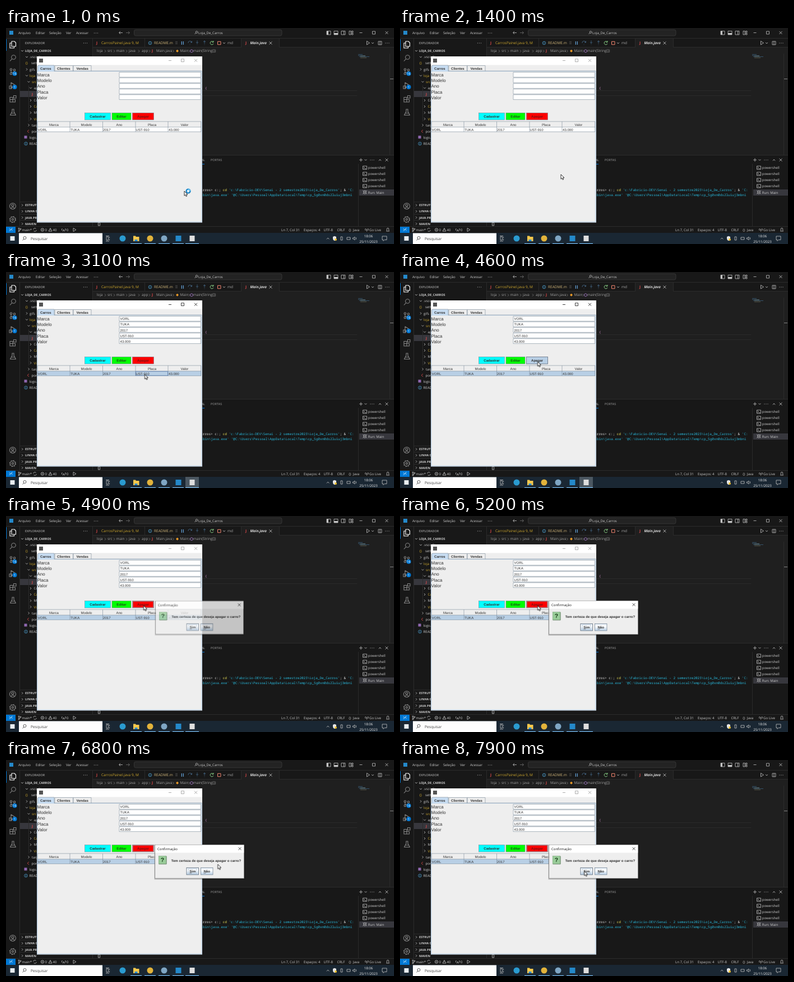
These frames come from a looping animation (692 px wide and 388 px high, 8000 ms). An HTML page:

```html
<!DOCTYPE html>
<html lang="pt-BR">
<head>
<meta charset="utf-8">
<title>Loja de carros</title>
<style>
html, body { margin: 0; width: 100%; height: 100%; overflow: hidden; background: #181818; }
svg { display: block; width: 100vw; height: 100vh; }
text { font: 6.1px "Open Sans", sans-serif; fill: #ccc; text-rendering: geometricPrecision; white-space: pre; }
.tabs text { font-size: 6.5px; }
.crumbs text { font-size: 6.4px; fill: #a0a0a0; }
.small text { font-size: 5.5px; }
.bold text { font-size: 5.5px; font-weight: 700; }
.mono text { font: 6px "Noto Sans Mono", monospace; fill: #29b8db; }
.swing text { font: 6.1px "Liberation Sans", Arial, sans-serif; fill: #333; }
.swing .b text, .swing text.b { font-weight: 700; }
.swing .label text { font-size: 8px; }
.mid { text-anchor: middle; }
.line { fill: none; stroke: #c5c5c5; stroke-width: .8; }
.solid { fill: #c5c5c5; }
.rule { fill: none; stroke: #2b2b2b; }
.metal { fill: none; stroke: #7a8a99; stroke-width: .6; }
.yellow, text.yellow { fill: #cca72e; }
.red, text.red { fill: #e0494b; font-weight: 700; }
.white, text.white { fill: #fff; }
.plain, text.plain { fill: #ddd; }

/* The small lead keeps samples off the step edges. */
.anim { animation: 8s -5ms step-end infinite; }
#cursor { animation-name: move; }
#busy { animation-name: busy; }
#selected { animation-name: select; }
#cellFocus { animation-name: cell; }
#titleIcons { animation-name: activate; }
#taskActive { animation-name: task; }
#pressed { animation-name: press; }
#dialogOpen { animation-name: open; transform-origin: 345px 182px; }
#ring { animation-name: ring; }

@keyframes move {
  0% { transform: translate(318px, 293px); animation-timing-function: steps(8); }
  10%, 13.75% { transform: translate(301px, 286px); }
  13.75% { animation-timing-function: steps(3); }
  17.5% { transform: translate(287px, 263px); animation-timing-function: steps(6); }
  25%, 48.75% { transform: translate(247.5px, 184px); }
  48.75% { animation-timing-function: steps(7); }
  57.5%, 67.5% { transform: translate(245.5px, 161px); }
  67.5% { animation-timing-function: steps(5); }
  73.75% { transform: translate(339.5px, 178.5px); animation-timing-function: steps(4); }
  78.75% { transform: translate(409px, 181.5px); animation-timing-function: steps(6); }
  86.25%, 88.75% { transform: translate(371.5px, 188.5px); }
  88.75% { animation-timing-function: steps(8); }
  98.75%, 100% { transform: translate(328.7px, 199.5px); }
}
@keyframes busy { 0% { opacity: 1; } 6.25%, 100% { opacity: 0; } }
@keyframes select { 0% { opacity: 0; } 32.5%, 100% { opacity: 1; } }
@keyframes cell { 0% { opacity: 0; } 32.5% { opacity: 1; } 57.5%, 100% { opacity: 0; } }
@keyframes activate { 0% { stroke: #999; } 32.5% { stroke: #111; } 60%, 100% { stroke: #999; } }
@keyframes task { 0% { opacity: 0; } 32.5% { opacity: 1; } 60%, 100% { opacity: 0; } }
@keyframes press { 0% { opacity: 0; } 57.5% { opacity: 1; } 60%, 100% { opacity: 0; } }
@keyframes ring { 0% { opacity: 0; } 60%, 100% { opacity: 1; } }
@keyframes open {
  0% { opacity: 0; transform: scale(.94); }
  60% { opacity: .3; transform: scale(.95); }
  61.25% { opacity: .8; transform: scale(.987); }
  62.5%, 100% { opacity: 1; transform: none; }
}
</style>
</head>
<body>
<svg viewBox="0 0 692 388" preserveAspectRatio="none">
<defs>
  <path id="right" class="line" d="M-1-2 1 0-1 2"/>
  <path id="down" class="line" d="M-2-1 0 1 2-1"/>
  <path id="cross" d="M-2.5-2.5 2.5 2.5M2.5-2.5-2.5 2.5"/>
  <g id="dots" fill="#c5c5c5"><circle cx="-3" r=".6"/><circle r=".6"/><circle cx="3" r=".6"/></g>
  <g id="info"><circle r="2.8" fill="none" stroke="#4da3d4" stroke-width=".8"/><path d="M0-.5V1.6M0-1.7v.6" stroke="#4da3d4" stroke-width=".8"/></g>
  <g id="shell" class="line"><path d="M-3.5-3h7v6h-7zM-2-1.5-.5 0-2 1.5M0 1.7h2"/></g>
  <linearGradient id="metalFill" x2="0" y2="1">
    <stop stop-color="#dde8f3"/><stop offset=".35" stop-color="#fff"/><stop offset="1" stop-color="#b8cfe5"/>
  </linearGradient>
</defs>

<!-- Editor frame -->
<rect width="692" height="388" fill="#181818"/>
<rect x="154" y="34" width="538" height="194" fill="#1f1f1f"/>
<path class="rule" d="M0 18.5H692M24.5 19V356M154.5 19V356M154 228.5H692M0 356.5H692M154 34.5H420M487 34.5H692M247.5 19V34M419.5 19V34M487.5 19V34M628.5 244V356"/>
<rect x="420" y="19" width="67" height="16" fill="#1f1f1f"/>
<path d="M.5 20v21" stroke="#0078d4"/>

<!-- Title bar -->
<rect x="6" y="5" width="7" height="7" fill="#2489ca"/>
<text x="22" y="11">Arquivo</text><text x="53" y="11">Editar</text><text x="77" y="11">Seleção</text>
<text x="107" y="11">Ver</text><text x="125" y="11">Acessar</text>
<use href="#dots" x="160.5" y="9"/>
<path class="line" d="M208 8.5h-6M204 6l-2.5 2.5L204 11"/>
<path class="line" opacity=".5" d="M214 8.5h6M218 6l2.5 2.5L218 11"/>
<rect x="228.5" y="3" width="263.5" height="11" rx="3" fill="#232323" stroke="#3c3c3c" stroke-width=".8"/>
<path class="line" d="M336.5 11l2-2M341.8 7.5a1.8 1.8 0 1 1-3.6 0a1.8 1.8 0 1 1 3.6 0"/>
<text x="343" y="11">Loja_De_Carros</text>
<path class="line" d="M572 5.5h7V12h-7zM585 5.5h7V12h-7zM598 5.5h7V12h-7zM602.5 5.5V12M612 5.5h3V12h-3zM616.5 5.5h2.5V8h-2.5zM616.5 9.5h2.5V12h-2.5zM630.5 8.5h5M653.5 6h5v5h-5z"/>
<path class="solid" d="M572 5.5h3V12h-3zM585 9h7v3h-7z"/>
<use href="#cross" class="line" x="679" y="8.5"/>

<!-- Activity bar -->
<g class="line" stroke-linejoin="round" style="stroke:#868686;stroke-width:1.1">
  <path style="stroke:#fff" d="M10 24h5l2.5 2.5V33H10zM10 27H7v9h7.5v-3"/>
  <circle cx="13.5" cy="52.5" r="3.8"/><path d="M10.8 55.3 7 59.5"/>
  <circle cx="9" cy="74.5" r="1.7"/><circle cx="9" cy="82" r="1.7"/><circle cx="15" cy="75.5" r="1.7"/><path d="M9 76.2v4M15 77.2q0 2.5-6 3"/>
  <path d="M9 98l8 5-8 5zM6 104h4v5H6z"/>
  <path d="M7 124.5h5v8.5H7zM7 128.5h9.5v4.5H12M13.5 121.5H18v4.5h-4.5z"/>
  <path d="M10.5 146h4M11 146v4l-3.5 6.5h10L14 150v-4M9.5 153h6"/>
  <circle cx="12" cy="320" r="5.5"/><circle cx="12" cy="318.5" r="2"/><path d="M8.5 324q3.5-4 7 0"/>
  <circle cx="12" cy="344" r="4.5"/><circle cx="12" cy="344" r="1.6"/><circle cx="12" cy="344" r="5.5" stroke-dasharray="2.2 2.12"/>
</g>
<g fill="#0078d4"><circle cx="15.5" cy="82" r="4"/><circle cx="15.5" cy="106" r="4"/></g>
<g class="mid small"><text class="white" x="15.5" y="83.9">16</text><text class="white" x="15.5" y="107.9">1</text></g>

<!-- Explorer -->
<g class="small"><text x="34" y="29">EXPLORADOR</text></g>
<use href="#dots" x="141.5" y="27"/>
<rect x="25" y="113" width="129" height="11" fill="#37373d"/>
<g class="bold">
  <text x="34" y="43">LOJA_DE_CARROS</text>
  <text x="34" y="320.3">ESTRUTURA</text><text x="34" y="331.3">LINHA DO TEMPO</text>
  <text x="34" y="342.5">JAVA PROJECTS</text><text x="34" y="353.7">MAVEN</text>
</g>
<path class="rule" d="M25 312.5h30M25 323.5h30M25 334.5h30M25 345.5h30M40.5 103v65"/>
<use href="#down" x="29" y="41"/><use href="#right" x="29" y="318.3"/><use href="#right" x="29" y="329.3"/>
<use href="#right" x="29" y="340.5"/><use href="#right" x="29" y="351.7"/>
<use href="#down" x="37" y="52"/><use href="#right" x="37" y="74.3"/><use href="#down" x="37" y="85.5"/>
<use href="#down" x="40.5" y="96.6"/><use href="#down" x="44" y="107.7"/><use href="#right" x="44" y="130"/>
<use href="#right" x="44" y="141"/><use href="#right" x="44" y="152.2"/><use href="#right" x="44" y="163.3"/><use href="#right" x="40.5" y="174.5"/>
<text x="42" y="54.3">.vscode</text>
<text class="yellow" x="34.5" y="65.3">{}</text><text x="45" y="65.3">settings.json</text>
<text x="42" y="76.5">gifs</text><text class="yellow" x="42" y="87.5">loja</text>
<text class="yellow" x="46" y="98.7">src</text><text x="49.5" y="109.9">app</text>
<text class="red" x="46" y="121">J</text>
<text x="49.5" y="132.2">Connection</text><text class="yellow" x="49.5" y="143.2">Carros</text>
<text x="49.5" y="154.4">Model</text><text class="yellow" x="49.5" y="165.5">View</text>
<text x="46" y="176.6">target</text>
<path d="M41 183l-3 2.5 3 2.5" class="line" style="stroke:#e0494b"/><text x="45.5" y="187.8">pom.xml</text>
<rect x="32.5" y="193.5" width="5" height="5" fill="#9068b0"/><text x="41.5" y="199">logo.png</text>
<use href="#info" x="35.5" y="207.7"/><text x="41.5" y="210">README.md</text>

<!-- Editor tabs -->
<g class="tabs">
  <text class="red" x="161" y="29.3">J</text><text class="yellow" x="170" y="29.3">CarrosPainel.java 9, M</text>
  <use href="#info" x="257" y="27"/><text x="264" y="29.3" style="fill:#d0b57a">README.md</text>
  <text x="395" y="29.3" style="fill:#a8a8a8">md</text>
  <rect x="298" y="20" width="95.5" height="14" fill="#181818"/>
  <text class="red" x="427" y="29.3">J</text><text class="white" x="435.5" y="29.3" style="font-style:italic;font-weight:600">Main.java</text>
</g>
<g fill="none" stroke="#75beff">
  <path stroke="#777" stroke-dasharray="1 1" d="M303 24v6M305 24v6"/>
  <path d="M313.3 24v6M316.3 24v6"/>
  <path opacity=".4" d="M325 27a3 3 0 0 1 6-1M331.5 23.5V26H329M328 29.5v.8M341 22.5v5M339 25.5l2 2 2-2M341 29.5v.8M354 28v-5M352 25l2-2 2 2M354 29.5v.8"/>
  <path stroke="#89d185" d="M369.5 25a3 3 0 1 0 .5 3M370 23v2.5h-2.5"/>
  <path stroke="#f48771" d="M377.5 24.3h5.5v5.5h-5.5z"/>
</g>
<use href="#down" x="389" y="27"/>
<use href="#cross" class="line" x="472" y="27"/>
<path class="line" d="M643.5 23.5l5 3.3-5 3.3zM664 24h6v6h-6zM667 24v6"/>
<use href="#down" x="654" y="27"/><use href="#dots" x="680" y="27"/>

<!-- Breadcrumb and code -->
<g class="crumbs">
  <text x="162" y="43.4">loja</text><text x="181" y="43.4">src</text><text x="196.5" y="43.4">main</text>
  <text x="219" y="43.4">java</text><text x="242" y="43.4">app</text><text class="red" x="260" y="43.4" style="fill:#e0494b">J</text>
  <text x="268" y="43.4">Main.java</text><text x="310.5" y="43.4">Main</text><text x="334" y="43.4">main(String[])</text>
</g>
<g opacity=".6"><use href="#right" x="177" y="41.5"/><use href="#right" x="193" y="41.5"/><use href="#right" x="215" y="41.5"/>
<use href="#right" x="237" y="41.5"/><use href="#right" x="256" y="41.5"/><use href="#right" x="298.5" y="41.5"/><use href="#right" x="327" y="41.5"/></g>
<path d="M303 41.3l2.5-2.5 2.5 2.5-2.5 2.5z" fill="#ee9d28"/><path d="M331 38.7l2.3 1.3v2.7L331 44l-2.3-1.3V40z" fill="none" stroke="#b180d7" stroke-width=".8"/>
<path class="rule" d="M350 112.5h276M350 121.5h276M684.5 46V228"/>
<g class="mono"><text x="355" y="109.7" style="fill:#c586c0">{</text></g>
<g fill="none" stroke-width=".7" opacity=".7">
  <path stroke="#4d88b5" d="M628 47.5h8M628 49.5h13M630 51.5h18"/><path stroke="#9a9a7a" d="M632 50.5h9M632 53.5h11"/>
</g>
<path d="M685 91.5h6" stroke="#888"/>

<!-- Terminal -->
<g class="small"><text x="328" y="239">TERMINAL</text><text x="365" y="239" style="fill:#a0a0a0">PORTAS</text></g>
<path d="M329 244.5h25" stroke="#0078d4"/>
<path class="line" d="M630 237h6M633 234v6M665 238.5l2-2.5 2 2.5"/>
<use href="#down" x="641.5" y="237"/><use href="#dots" x="653" y="237"/><use href="#cross" class="line" x="679" y="237"/>
<g class="mono">
  <text x="347" y="293.2"><tspan class="plain">arros&gt; c:; </tspan><tspan fill="#f0e65a">cd</tspan> 'c:\Fabricio-DEV\Senai - 2 semestre2023\Loja_De_Carros'<tspan class="plain">; &amp; </tspan>'C:</text>
  <text x="347.5" y="302">\bin\java.exe' '@C:\Users\Pessoal\AppData\Local\Temp\cp_5g0xn0ds2luiuj3mbni</text>
</g>
<path class="line" d="M164.5 349.5h3v5.5h-3z"/>
<rect x="630" y="290" width="62" height="11" fill="#37373d"/>
<use href="#shell" x="640" y="251"/><use href="#shell" x="640" y="262"/><use href="#shell" x="640" y="273"/><use href="#shell" x="640" y="284"/>
<path class="line" d="M638 294a2 2 0 0 1 4 0v2a2 2 0 0 1-4 0zM636.3 292l1.7 1.5M643.7 292l-1.7 1.5M636.3 298l1.7-1.5M643.7 298l-1.7-1.5M638 295h4"/>
<text x="645.7" y="253.3">powershell</text><text x="645.7" y="264.3">powershell</text><text x="645.7" y="275.3">powershell</text>
<text x="645.7" y="286.3">powershell</text><text x="645.7" y="297.5">Run: Main</text>

<!-- Status bar -->
<rect y="357" width="17" height="11" fill="#0078d4"/>
<path class="line" style="stroke:#fff" d="M6 360.5l2.5 2-2.5 2M11.5 359.5l-2.5 2 2.5 2"/>
<g class="line">
  <circle cx="23" cy="360" r="1"/><circle cx="23" cy="365" r="1"/><circle cx="26" cy="361" r="1"/><path d="M23 361v3M26 362q0 1.5-3 1.5"/>
  <path d="M48.5 362a3 3 0 0 1 5-1.5M54.5 363a3 3 0 0 1-5 1.5"/>
  <circle cx="65" cy="362.5" r="2.7"/><path d="M64 361.5l2 2M66 361.5l-2 2M76 365l3-5.5 3 5.5zM79 361.5v1.5"/>
  <path d="M100.500 360a2.500 2.500 0 0 0 0 4M105.500 360a2.500 2.500 0 0 1 0 4M103 362l-1.500 3.500M103 362l1.500 3.500M120 359.5l5 3-5 3z"/>
  <circle cx="643.5" cy="362" r=".6"/><path d="M641.5 364a2.800 2.800 0 0 1 0-4M645.5 360a2.800 2.800 0 0 1 0 4M643.5 362v3.5M678.5 365h5l-.8-1.500V361a1.700 1.700 0 0 0-3.400 0v2.500z"/>
</g>
<text x="28.5" y="364.7">main*</text><text x="69.5" y="364.7">0</text><text x="83.5" y="364.7">40</text><text x="108" y="364.7">0</text>
<text x="491" y="364.7">Ln 7, Col 31</text><text x="531" y="364.7">Espaços: 4</text><text x="566.5" y="364.7">UTF-8</text>
<text x="590.5" y="364.7">CRLF</text><text x="611" y="364.7">{}  Java</text><text x="648" y="364.7">Go Live</text>

<!-- Taskbar -->
<rect y="368" width="692" height="20" fill="#1a2733"/>
<rect x="7.5" y="374" width="8" height="8" fill="#e8eef2"/>
<rect x="23" y="368.5" width="149" height="19.5" fill="#fdfdfd"/>
<path class="line" style="stroke:#333" d="M29.5 381.5l2.5-2.5M36 377a2.5 2.5 0 1 1-5 0a2.5 2.5 0 1 1 5 0"/>
<text x="44" y="380.8" style="font-size:6.7px;fill:#444">Pesquisar</text>
<path class="line" d="M179 375h3.5v6H179zM184.5 375v2.5M184.5 379v2.5M178 373.5h6M178 383h6"/>
<rect id="taskActive" class="anim" x="320" y="368" width="24" height="20" fill="#4b5761"/>
<circle cx="208" cy="378" r="5.5" fill="#2a9bd0"/>
<path d="M227 373.5h4l1 1.5h5.5v8H227z" fill="#f5c84c"/><path d="M229.5 380h5v3h-5z" fill="#2c8ad0"/>
<circle cx="257" cy="378" r="5.5" fill="#e2b33b"/><circle cx="282" cy="378" r="5.5" fill="#7fa6c4"/>
<rect x="302.5" y="373" width="10" height="10" fill="#2489ca"/><rect x="327.5" y="373" width="9" height="10" fill="#dedede"/>
<path d="M222 387.3h20M247 387.3h20M272 387.3h20M297 387.3h20M320 387.3h24" stroke="#76b9ed" stroke-width="1.2"/>
<path class="line" d="M572 379.5l2.2-2.5 2.2 2.5M608 376h6v4h-6zM597 375h3v6h-3zM618.5 377h1.5l2-2v6l-2-2h-1.5zM624 376q1.5 2 0 4"/>
<path d="M583 375l3-1.2 3 1.2v3q0 3-3 4.2q-3-1.2-3-4.2z" fill="#e7e7e7"/><circle cx="588" cy="380" r="2" fill="#f2c230"/>
<g class="mid"><text x="646.5" y="376.3" style="fill:#eee">18:06</text><text x="646.5" y="385.7" style="fill:#eee">25/11/2023</text></g>
<path d="M671 374h8v6.5h-4l-2 2v-2h-2z" class="line"/>

<!-- Application window -->
<g class="swing">
  <rect x="55" y="51" width="295" height="298.5" fill="#eee"/>
  <rect x="55" y="51" width="295" height="15.5" fill="#fff"/>
  <rect x="55.6" y="77.6" width="293.4" height="270.9" fill="none" stroke="#b8cfe5" stroke-width="1.2"/>
  <rect x="59" y="55" width="7" height="7" fill="#555"/>
  <g id="titleIcons" class="anim" fill="none" stroke="#999" stroke-width=".8"><path d="M290 58.5h5M312.5 55.7h5v5h-5z"/><use href="#cross" x="338.5" y="58.3"/></g>

  <path d="M56.5 77.5V68.5l1.5-1.5H86v10.5z" fill="#c8ddf2"/>
  <path class="metal" d="M56.5 77.5V68.5l1.5-1.5H86v10.5M87 77.5V67.5h32.5v10M120 77.5V67.5h32v10M86 77.2H349"/>
  <g class="b"><text x="61" y="74.5">Carros</text><text x="91" y="74.5">Clientes</text><text x="125.5" y="74.5">Vendas</text></g>
  <g class="label">
    <text x="55.5" y="87.2">Marca</text><text x="55.5" y="97.3">Modelo</text><text x="55.5" y="107.4">Ano</text>
    <text x="55.5" y="117.5">Placa</text><text x="55.5" y="127.6">Valor</text>
  </g>
  <path class="metal" style="fill:#fff" d="M202 79.5h145.5v8.7H202zM202 89.6h145.5v8.7H202zM202 99.7h145.5v8.7H202zM202 109.8h145.5v8.7H202zM202 119.9h145.5v8.7H202z"/>

  <rect class="metal" style="fill:#0ff" x="140.5" y="152.5" width="46" height="12.5"/>
  <rect class="metal" style="fill:#0f0" x="189" y="152.5" width="34" height="12.5"/>
  <rect class="metal" style="fill:#f00" x="225.5" y="152.5" width="38" height="12.5"/>
  <g class="b mid"><text x="163.5" y="161">Cadastrar</text><text x="206" y="161" style="fill:#1c4a1c">Editar</text><text x="244.5" y="161" style="fill:#7c1212">Apagar</text></g>
  <rect id="ring" class="anim" x="226.3" y="153.3" width="36.4" height="10.9" fill="none" stroke="#a08088" stroke-width=".9"/>
  <g id="pressed" class="anim mid">
    <rect x="225.5" y="152.5" width="38" height="12.5" fill="#b8cfe5" stroke="#6c7c8c" stroke-width=".8"/><text class="b" x="244.5" y="161">Apagar</text>
  </g>

  <rect x="56" y="178" width="292" height="8.5" fill="#fff"/>
  <g id="selected" class="anim">
    <rect x="56" y="178" width="292" height="8.5" fill="#b8cfe5"/>
    <text x="203.5" y="86.3">VORL</text><text x="203.5" y="96.4">TUKA</text><text x="203.5" y="106.5">2017</text>
    <text x="203.5" y="116.6">UST-910</text><text x="203.5" y="126.7">43.000</text>
  </g>
  <path class="metal" d="M56 168H348M56 178H348M56 186.5H348M56 168v18.5M114 168v18.5M172.5 168v18.5M231 168v18.5M289 168v18.5M347.7 168v18.5"/>
  <rect id="cellFocus" class="anim" x="231.5" y="178.7" width="57" height="7.3" fill="none" stroke="#5f7fb0" stroke-width=".8"/>
  <g class="mid"><text x="85.5" y="175.5">Marca</text><text x="143.5" y="175.5">Modelo</text><text x="202" y="175.5">Ano</text><text x="260.5" y="175.5">Placa</text><text x="318.5" y="175.5">Valor</text></g>
  <text x="56.8" y="184.5">VORL</text><text x="115" y="184.5">TUKA</text><text x="173" y="184.5">2017</text><text x="231.5" y="184.5">UST-910</text><text x="290" y="184.5">43.000</text>

  <!-- Confirmation dialog -->
  <g id="dialogOpen" class="anim">
    <rect x="264.5" y="152" width="162" height="63" fill="#000" opacity=".18"/>
    <rect x="265.7" y="152.3" width="159" height="60.5" fill="#eee" stroke="#666" stroke-width=".7"/>
    <rect x="266" y="152.6" width="158.3" height="14" fill="#fff"/>
    <text x="270" y="161.5" style="font:6px 'Open Sans',sans-serif;fill:#111">Confirmação</text>
    <use href="#cross" x="417" y="159.3" stroke="#222" stroke-width=".8"/>
    <rect x="272.3" y="172.5" width="13.5" height="14" fill="#99cc99" stroke="#7aa37a" stroke-width=".6"/>
    <path d="M272.5 187h13.7v-14" fill="none" stroke="#5f7f5f" stroke-width=".8"/>
    <text class="b mid" x="279" y="183.3" style="font-size:10.5px;fill:#163c16">?</text>
    <text class="b" x="294.7" y="182.8">Tem certeza de que deseja apagar o carro?</text>
    <g fill="url(#metalFill)" stroke="#7a8a99" stroke-width=".8"><rect x="322" y="193.5" width="21.5" height="12.5" stroke="#5c6c7c"/><rect x="347.5" y="193.5" width="21.5" height="12.5"/></g>
    <rect x="325.5" y="195.5" width="14.5" height="8.5" fill="none" stroke="#a3b8cc" stroke-width=".6"/>
    <g class="b mid"><text x="332.8" y="202">Sim</text><text x="358.2" y="202">Não</text></g>
    <path d="M327.3 203.2h4M352.3 203.2h4.3" stroke="#333" stroke-width=".6"/>
  </g>
</g>

<g id="cursor" class="anim">
  <g id="busy" class="anim"><circle cx="7" cy="0" r="3.5" fill="#d8f0fb" stroke="#1680c4" stroke-width="2.2"/><path d="M7-3.5a3.5 3.5 0 0 1 3.5 3.5" fill="none" stroke="#5fc0f0" stroke-width="1.8"/></g>
  <path d="M0 0v8.3l1.9-1.7 1.3 3 1.5-.7-1.3-2.9H6z" fill="#fff" stroke="#000" stroke-width=".8"/>
</g>
</svg>
</body>
</html>
```
